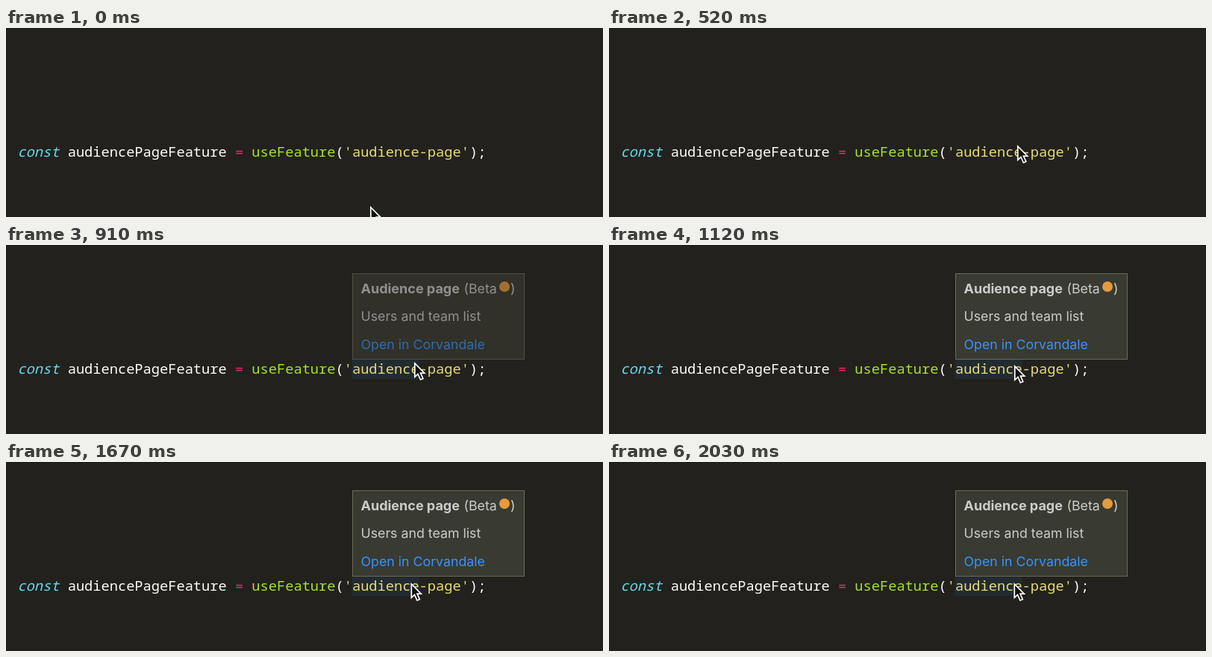
Recreate the animation shown at these times as an HTML page. Size 800x254 px, loop 2.06 s.

```html
<!DOCTYPE html>
<html lang="en">
<head>
<meta charset="utf-8">
<title>Editor hover</title>
<style>
  html, body { margin: 0; width: 100%; height: 100%; overflow: hidden; background: #22211d; }
  svg { display: block; width: 100%; height: 100%; }
  text { white-space: pre; }
  .code { font: 500 18.69px "Noto Sans Mono", monospace; fill: #fdfdf8; }
  .keyword { fill: #66d9ef; font-style: italic; font-weight: 400; }
  .operator { fill: #f92672; }
  .call { fill: #a6e22e; }
  .string { fill: #e6db74; }
  .tip { font: 17.75px Inter, sans-serif; fill: #ccc; }
  .bold { font-size: 18px; font-weight: 700; }
  .link { fill: #3794ff; }
</style>
</head>
<body>
<svg viewBox="0 0 800 254">
  <rect width="800" height="254" fill="#22211d"/>
  <rect width="800" height="1" fill="#1b1a17"/>
  <rect id="highlight" x="463.5" y="154" width="90" height="26" fill="#232b32"/>
  <text class="code" x="15.4" y="173"><tspan class="keyword">const</tspan> audiencePageFeature <tspan class="operator">=</tspan> <tspan class="call">useFeature</tspan>(<tspan class="string">'audience-page'</tspan>);</text>
  <g id="tooltip">
    <rect x="464.5" y="38.5" width="230" height="115" fill="#393a31" stroke="#6b6a58"/>
    <text class="tip bold" x="475.5" y="64.5">Audience page</text>
    <text class="tip" x="613.5" y="64.5">(Beta</text>
    <circle cx="668" cy="56" r="7" fill="#e59a3c"/>
    <text class="tip" x="676" y="64.5">)</text>
    <text class="tip" x="475.5" y="102">Users and team list</text>
    <text class="tip link" x="475.5" y="140">Open in Corvandale</text>
  </g>
  <path id="cursor" d="M.8 2V20.4L5 16.5L8.4 24L11.8 22.5L8.5 15.2H13.8Z" fill="#111" stroke="#fff" stroke-width="1.7"/>
</svg>
<script>
  const LOOP = 2060, STEP = 30;
  const [highlight, tooltip, cursor] =
    ["highlight", "tooltip", "cursor"].map(id => document.getElementById(id));

  const progress = (t, from, to) => Math.min(1, Math.max(0, (t - from) / (to - from)));
  const smooth = p => p * p * (3 - 2 * p);
  const mix = (a, b, p) => a + (b - a) * p;

  // Cursor keys: time, x, y of the tip
  const path = [[0, 488, 239], [450, 547, 157], [940, 547, 157], [1090, 543, 161], [1200, 543, 161], [1300, 542.5, 162]];

  function cursorAt(t) {
    let [, x, y] = path[0];
    for (let i = 1; i < path.length; i++) {
      const p = smooth(progress(t, path[i - 1][0], path[i][0]));
      x = mix(x, path[i][1], p);
      y = mix(y, path[i][2], p);
    }
    return [x, y];
  }

  function draw(t) {
    const [x, y] = cursorAt(t);
    cursor.setAttribute("transform", `translate(${x} ${y})`);
    tooltip.setAttribute("opacity", progress(t, 835, 935));
    highlight.setAttribute("opacity", t >= 835 ? 1 : 0);
  }

  const start = performance.now();
  function tick() {
    const t = (performance.now() - start) % LOOP;
    draw(Math.floor(t / STEP) * STEP);
    requestAnimationFrame(tick);
  }
  tick();
</script>
</body>
</html>
```
